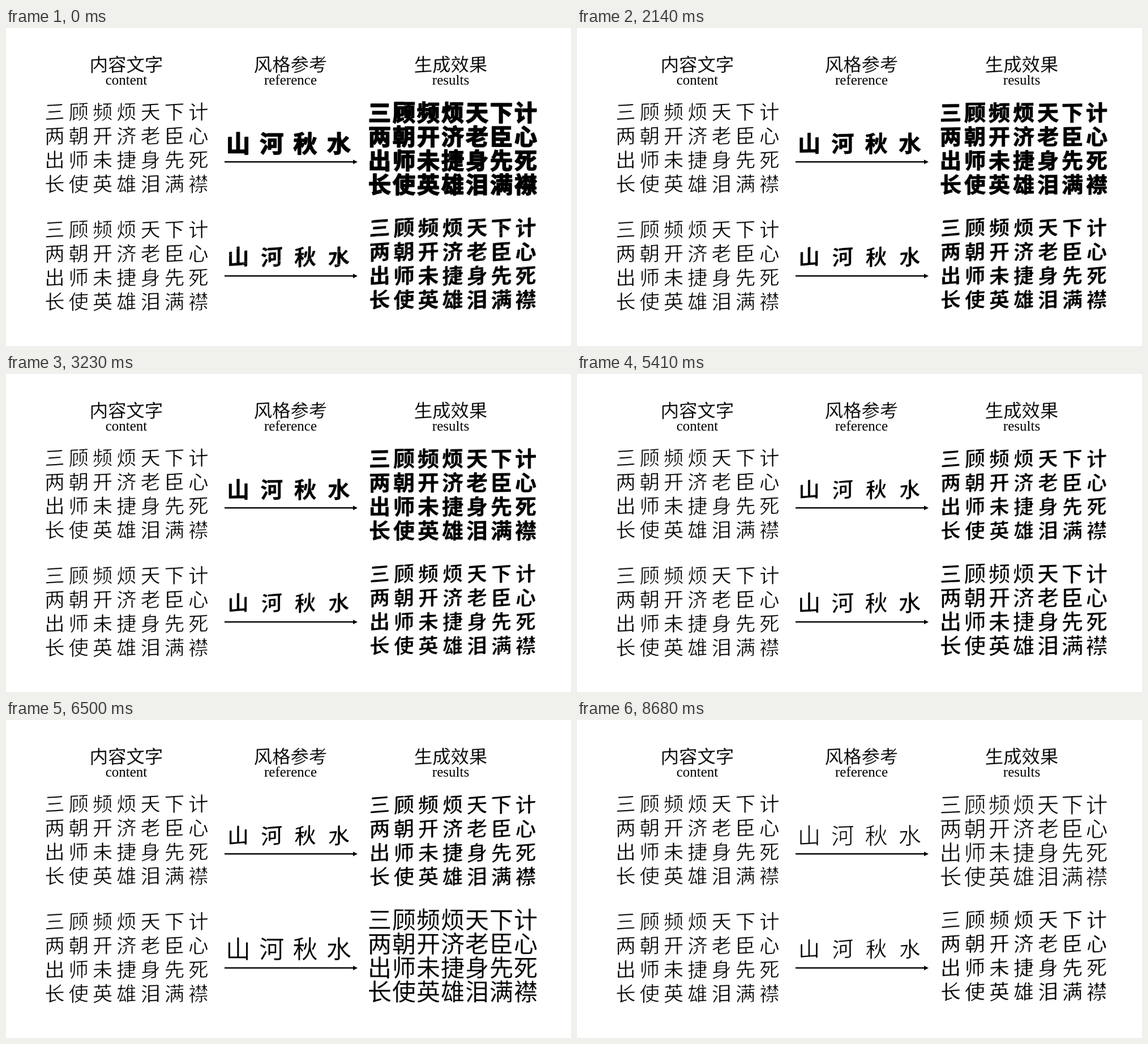
Write an HTML page with a canvas that moves like this. It is 998 px wide and 561 px high and loops after 9.77 s.

```html
<!DOCTYPE html>
<html lang="zh-CN">
<head>
<meta charset="utf-8">
<title>字体风格生成</title>
<style>
  html, body { margin: 0; width: 100%; height: 100%; overflow: hidden; background: #fff; }
  canvas { display: block; width: 998px; height: 561px; }
</style>
</head>
<body>
<canvas id="stage"></canvas>
<script>
const W = 998, H = 561, LOOP = 9770, FIRST = 1050, STEP = 1090;
const HAN = '"Noto Sans CJK SC", "Noto Sans CJK", sans-serif';
const POEM = ['三顾频烦天下计', '两朝开济老臣心', '出师未捷身先死', '长使英雄泪满襟'];
const SAMPLE = '山河秋水';
const CELL = 72, SS = 3;
const dpr = window.devicePixelRatio || 1;

// brush: how far the pen widens diagonals, slant: rise of horizontals, dry: bristle streaks
const BLOCK = { size: 40, brush: 0.5, slant: 0, dry: 0 };
const ROUND = { size: 38, brush: 0.3, slant: 0.02, dry: 0 };
const DRY = { size: 37, brush: 1, slant: 0.07, dry: 0.8 };
const BRUSH = { size: 36, brush: 0.9, slant: 0.08, dry: 0 };
const REGULAR = { size: 39, brush: 0.3, slant: 0.05, dry: 0 };
const PLAIN = { size: 42, brush: 0, slant: 0, dry: 0 };
const BODY = { size: 35.5, brush: 0.5, slant: 0.06, dry: 0 };
const HEAD = { size: 32.5, brush: 0.5, slant: 0.06, dry: 0 };

// Upper and lower look of each scene.
const SCENES = [
  [BLOCK, DRY], [ROUND, DRY], [ROUND, BRUSH],
  [ROUND, BRUSH], [ROUND, BRUSH], [BRUSH, REGULAR],
  [BRUSH, PLAIN], [REGULAR, REGULAR], [REGULAR, BRUSH]
];

const lerp = (a, b, k) => a + (b - a) * k;

function makeCanvas(w, h, scale) {
  const c = document.createElement('canvas');
  c.width = Math.round(w * scale);
  c.height = Math.round(h * scale);
  return c;
}

function random(seed) {
  return () => {
    seed = (seed * 1103515245 + 12345) % 2147483648;
    return seed / 2147483648;
  };
}

const shape = makeCanvas(CELL, CELL, SS), ink = makeCanvas(CELL, CELL, SS);
const sg = shape.getContext('2d'), ig = ink.getContext('2d');

function clear(g) {
  g.setTransform(1, 0, 0, 1, 0, 0);
  g.globalCompositeOperation = 'source-over';
  g.clearRect(0, 0, CELL * SS, CELL * SS);
}

// Thickens or thins the letterform so that the finished stem is about heft pixels wide.
function drawShape(ch, look, size, heft) {
  const bold = heft > 3.3;
  const stem = size * (bold ? 0.125 : 0.075);
  const change = Math.max(heft - stem - 1.1 * look.brush, -0.5 * stem);
  clear(sg);
  sg.setTransform(SS, -look.slant * SS, 0, SS, CELL * SS / 2, CELL * SS / 2);
  sg.font = `${bold ? 700 : 400} ${size}px ${HAN}`;
  sg.textAlign = 'center';
  sg.lineJoin = 'round';
  sg.fillText(ch, 0, size * 0.38);
  if (change < 0) sg.globalCompositeOperation = 'destination-out';
  sg.lineWidth = Math.abs(change) || 0.01;
  sg.strokeText(ch, 0, size * 0.38);
}

function inkShape(brush) {
  clear(ig);
  for (let k = -1; k <= 1; k += brush ? 0.5 : 3) {
    const reach = brush ? k * brush * SS : 0;
    ig.drawImage(shape, 0.6 * reach, -0.45 * reach);
  }
}

function streak(ch, dry) {
  const rnd = random(ch.charCodeAt(0));
  ig.globalCompositeOperation = 'destination-out';
  ig.lineCap = 'round';
  for (let i = 0; i < dry * 14; i++) {
    const x = (16 + rnd() * 40) * SS, y = (16 + rnd() * 40) * SS;
    const len = (4 + rnd() * 8) * SS;
    ig.globalAlpha = 0.3 + rnd() * 0.5;
    ig.lineWidth = (0.2 + rnd() * 0.5) * SS;
    ig.beginPath();
    ig.moveTo(x, y);
    ig.lineTo(x + len, y - len * 0.35);
    ig.stroke();
  }
  ig.globalAlpha = 1;
}

function line(g, text, x, y, pitch, look, heft, scale = 1) {
  [...text].forEach((ch, i) => {
    drawShape(ch, look, look.size * scale, heft);
    inkShape(look.brush);
    streak(ch, look.dry);
    g.drawImage(ink, x + i * pitch - CELL / 2, y - CELL / 2, CELL, CELL);
  });
}

function poem(g, x, y, dx, dy, look, heft) {
  POEM.forEach((row, i) => line(g, row, x, y + i * dy, dx, look, heft));
}

function heading(g, han, latin, x) {
  line(g, han, x - 48.6, 64, 32.4, HEAD, 2.2);
  g.font = '25px "Liberation Serif", "Times New Roman", serif';
  g.textAlign = 'center';
  g.fillText(latin, x, 100);
}

function arrow(g, y) {
  g.fillRect(386, y - 1.2, 229, 2.4);
  g.beginPath();
  g.moveTo(621, y);
  g.lineTo(613, y - 4);
  g.lineTo(613, y + 4);
  g.fill();
}

function makePage(paint) {
  const c = makeCanvas(W, H, dpr), g = c.getContext('2d');
  g.scale(dpr, dpr);
  g.imageSmoothingQuality = 'high';
  paint(g);
  return c;
}

const base = makePage(g => {
  g.fillStyle = '#fff';
  g.fillRect(0, 0, W, H);
  g.fillStyle = '#000';
  heading(g, '内容文字', 'content', 212.5);
  heading(g, '风格参考', 'reference', 502.5);
  heading(g, '生成效果', 'results', 785.5);
  poem(g, 86, 147.5, 42.3, 42.4, BODY, 2);
  poem(g, 86, 355, 42.3, 42.4, BODY, 2);
  arrow(g, 236.2);
  arrow(g, 437.4);
});

function block(g, look, heft, top, sampleY) {
  line(g, SAMPLE, 410, sampleY, 59.3, look, heft, 1.05);
  poem(g, 660, top, 43, 42.3, look, heft);
}

// The pen gets lighter from scene to scene.
const pages = [];
function page(n) {
  const k = n / (SCENES.length - 1);
  const [upper, lower] = SCENES[n];
  return pages[n] ||= makePage(g => {
    g.drawImage(base, 0, 0, W, H);
    block(g, upper, lerp(6.8, 2, k), 149, 203.5);
    block(g, lower, lerp(5, 2.4, k), 352, 403.5);
  });
}

const stage = document.getElementById('stage');
stage.width = Math.round(W * dpr);
stage.height = Math.round(H * dpr);
const view = stage.getContext('2d');
let shown = -1;

function frame() {
  const t = performance.now() % LOOP;
  const n = t < FIRST ? 0 : Math.min(SCENES.length - 1, 1 + Math.floor((t - FIRST) / STEP));
  if (n !== shown) {
    view.drawImage(page(n), 0, 0);
    shown = n;
  }
  requestAnimationFrame(frame);
}
frame();
</script>
</body>
</html>
```
